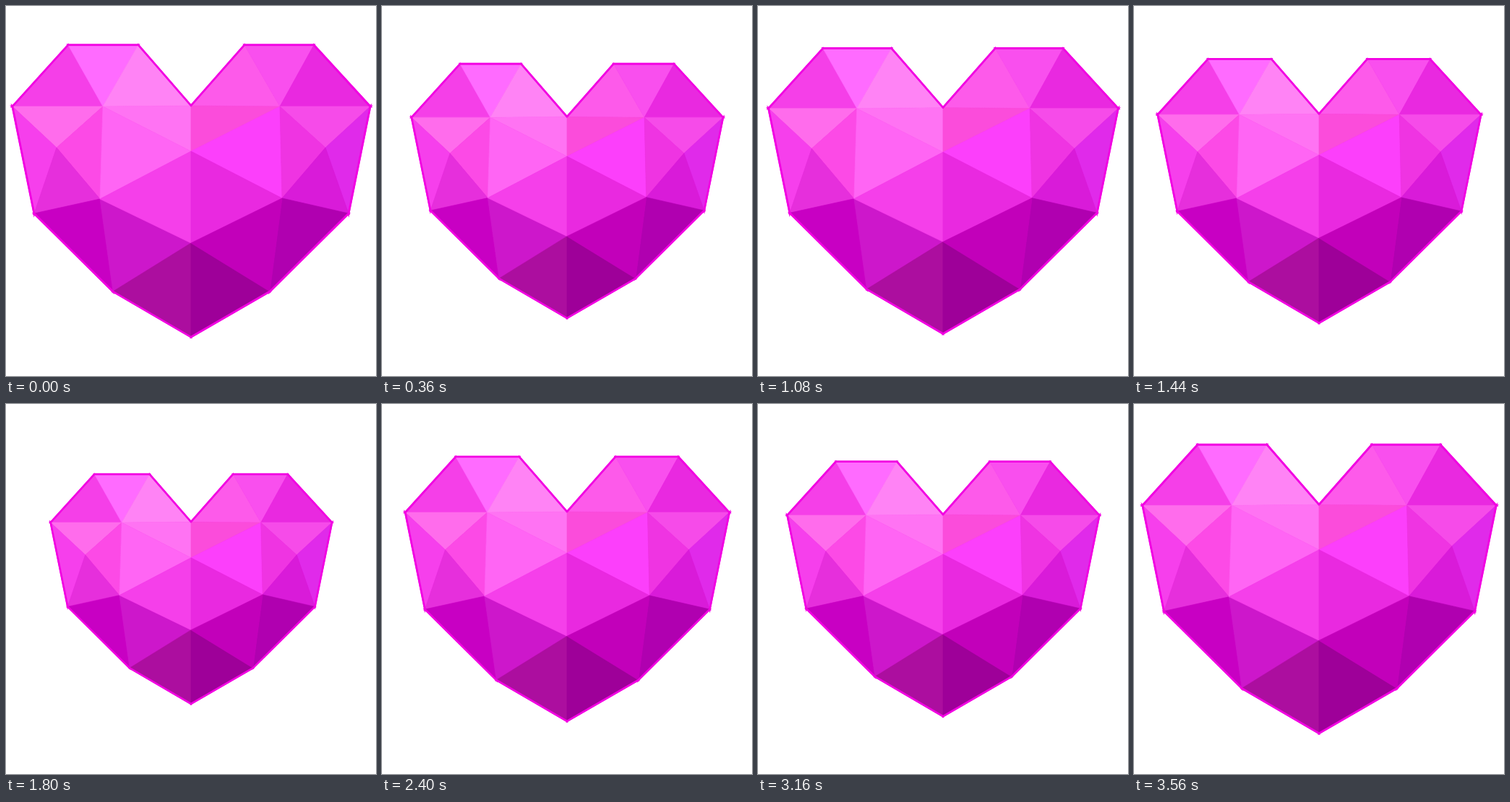
Animation of 512 by 512 pixels, one loop 3.6 s. Source, as an HTML page with a canvas:

```html
<!DOCTYPE html>
<html lang="en">
<head>
<meta charset="utf-8">
<title>Faceted heart</title>
<style>
html, body { margin: 0; width: 100%; height: 100%; overflow: hidden; background: #fff; }
canvas { display: block; width: 512px; height: 512px; }
</style>
</head>
<body>
<canvas id="stage" width="512" height="512"></canvas>
<script>
const ctx = document.getElementById('stage').getContext('2d');
const LOOP = 3600, STEP = 40, RIM = '#f200e2';

// Corners relative to the heart's centre
const pts = {
  A: [-170, -202], B: [-73, -202], C: [0, -118], D: [74, -202],
  E: [170, -202], F: [248, -117], G: [218, 31], H: [109, 139],
  I: [0, 202], J: [-108, 139], K: [-217, 31], L: [-247, -117],
  M: [-122, -117], N: [123, -117], O: [-186, -60], P: [186, -60],
  Q: [-126, 11], R: [126, 10], S: [0, -55], U: [0, 72]
};

function outline(corners) {
  const path = new Path2D();
  for (const c of corners) path.lineTo(...pts[c]);
  path.closePath();
  return path;
}

const facets = `
  LAM f53fe8, ABM ff6bff, BCM ff83f5, LMO ff6cec, LOK f63fec, OMQ fc4ae6,
  OQK e62fdc, KQJ c800c3, QUJ cd17cb, MCS ff73f3, MSQ ff65f4, QSU f53fea,
  JUI ac0e9f, UHI 9e0099, DCN fd5aea, DEN f94fee, EFN e929e0, CNS fb4cdb,
  SNR fc3ffb, SRU e929e0, NFP f64be9, NPR ef34e2, PFG e02aea, PRG d91bd9,
  RGH b000b0, URH c200ba`
  .split(',').map(item => {
    const [corners, color] = item.trim().split(' ');
    return { path: outline(corners), color: '#' + color };
  });
const rim = outline('ABCDEFGHIJKL');

// Beat: [time, scale], straight between keys
const beat = [
  [0, 1], [570, .795], [1144, 1], [1912, .75], [2695, 1], [3025, .833], [LOOP, 1]
];

function scaleAt(t) {
  const i = beat.findIndex(key => key[0] > t);
  const [t0, s0] = beat[i - 1], [t1, s1] = beat[i];
  return s0 + (s1 - s0) * (t - t0) / (t1 - t0);
}

function stroke(path, color, width, join) {
  ctx.strokeStyle = color;
  ctx.lineWidth = width;
  ctx.lineJoin = join;
  ctx.stroke(path);
}

function draw(t) {
  const s = scaleAt(t);
  ctx.setTransform(1, 0, 0, 1, 0, 0);
  ctx.fillStyle = '#fff';
  ctx.fillRect(0, 0, 512, 512);
  ctx.setTransform(s, 0, 0, s, 256, 256);
  // Mitred tips stick out from below at the corners
  for (const f of facets) stroke(f.path, RIM, 3, 'miter');
  for (const f of facets) {
    ctx.fillStyle = f.color;
    ctx.fill(f.path);
    stroke(f.path, f.color, .7, 'round');
  }
  stroke(rim, RIM, 2.6 / s, 'round');
}

const start = performance.now();
function tick() {
  const t = (performance.now() - start) % LOOP;
  draw(Math.floor(t / STEP) * STEP);
  requestAnimationFrame(tick);
}
tick();
</script>
</body>
</html>
```
